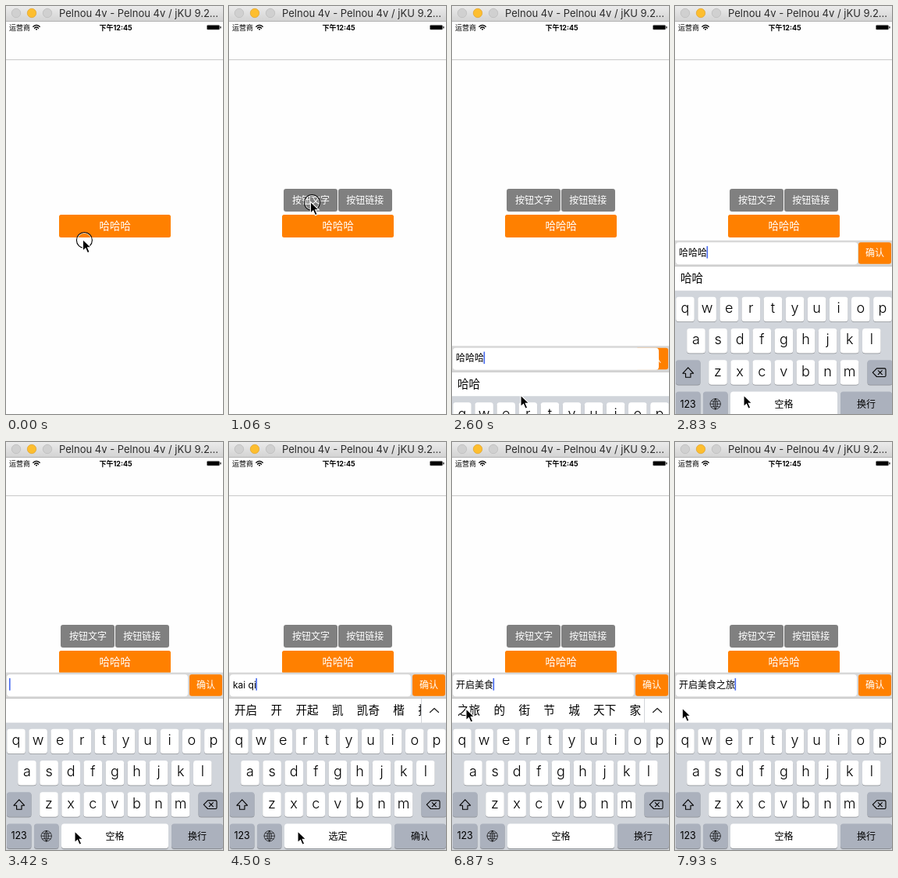
Animation of 278 by 520 pixels, one loop 8 s. Source, as an HTML page:

```html
<!DOCTYPE html>
<html lang="zh">
<head>
<meta charset="utf-8">
<style>
html, body { margin: 0; width: 100%; height: 100%; overflow: hidden; background: #fefefe; }
svg { display: block; width: 100%; height: 100%; }
text { font-family: Inter, 'Noto Sans CJK SC', 'Noto Sans CJK', sans-serif; white-space: pre; }
.cjk { font-family: 'Noto Sans CJK SC', 'Noto Sans CJK', sans-serif; }
.key { font-weight: 300; }
</style>
</head>
<body>
<svg id="stage" viewBox="0 0 278 520">
  <defs>
    <linearGradient id="chrome" x2="0" y2="1">
      <stop stop-color="#ebebeb"/><stop offset="1" stop-color="#d2d2d2"/>
    </linearGradient>
    <clipPath id="candClip"><rect y="33" width="246" height="31"/></clipPath>
  </defs>
</svg>
<script>
const NS = 'http://www.w3.org/2000/svg';
const TICK = 118.3, LOOP = 8000;
const ORANGE = '#ff8000', GRAY_KEY = '#abb1bd';
const BAR_LOW = 486, BAR_HIGH = 293.7;
const stage = document.getElementById('stage');

function el(parent, tag, attrs = {}) {
  const node = document.createElementNS(NS, tag);
  for (const name in attrs) node.setAttribute(name, attrs[name]);
  return parent.appendChild(node);
}
const set = (node, attrs) => { for (const name in attrs) node.setAttribute(name, attrs[name]); };
const show = (node, on) => node.setAttribute('visibility', on ? 'visible' : 'hidden');
const group = parent => el(parent, 'g');
const box = (parent, x, y, width, height, fill, rx = 0) =>
  el(parent, 'rect', { x, y, width, height, fill, rx });
function label(parent, str, x, y, size, fill = '#000', anchor = 'middle', cls = 'cjk') {
  const node = el(parent, 'text', { x, y, 'font-size': size, fill, 'text-anchor': anchor, class: cls });
  node.textContent = str;
  return node;
}
const line = (parent, d, width = 1, stroke = '#000') =>
  el(parent, 'path', { d, fill: 'none', stroke, 'stroke-width': width, 'stroke-linejoin': 'round', 'stroke-linecap': 'round' });

// window chrome, status bar, navigation bar
box(stage, 0, 0, 278, 520, '#fefefe');
box(stage, 0, 0, 278, 20, 'url(#chrome)');
box(stage, 0, 19, 278, 1, '#b4b4b4');
[['#d0d0d0', '#b9b9b9'], ['#fdbe2f', '#e0a12a'], ['#d0d0d0', '#b9b9b9']].forEach(([fill, stroke], i) =>
  el(stage, 'circle', { cx: 13 + 20 * i, cy: 9, r: 5.7, fill, stroke, 'stroke-width': 0.7 }));
label(stage, 'Pelnou 4v - Pelnou 4v / jKU 9.2...', 68, 14, 13, '#2b2b2b', 'start', '');
label(stage, '运营商', 4, 31, 9, '#000', 'start');
line(stage, 'M34.8 26.3Q39 22.4 43.2 26.3M36.5 28.2Q39 25.9 41.5 28.2', 1.3);
el(stage, 'path', { d: 'M37.6 29.4Q39 28.4 40.4 29.4L39 31Z' });
set(label(stage, '下午12:45', 140.5, 31, 9), { 'font-weight': 700, class: '' });
el(stage, 'rect', { x: 257.5, y: 24.4, width: 16, height: 5.7, rx: 1.2, stroke: '#777', 'stroke-width': 0.6 });
box(stage, 274.3, 26, 1.2, 2.6, '#000', 0.5);
box(stage, 0, 68, 278, 1, '#cacaca');

// page buttons
box(stage, 68, 266, 143, 29, ORANGE, 2.5);
label(stage, '哈哈哈', 139.7, 284.7, 13.4, '#fff').setAttribute('font-weight', 300);
const menu = group(stage);
['按钮文字', '按钮链接'].forEach((str, i) => {
  box(menu, 70 + 70 * i, 233, 69, 29, '#808080', 3);
  label(menu, str, 105 + 69.3 * i, 251.6, 12, '#fff');
});

// input bar with candidates and keyboard, all relative to the top of the bar
const panel = group(stage);
box(panel, 0, 0, 278, 34, '#d8d8d8');
const button = box(panel, 235, 2.6, 42, 27.4, ORANGE, 3);
label(panel, '确认', 256, 20.4, 12, '#fff');
const field = box(panel, 1, 2.5, 232, 28, '#fff', 4);
const typed = label(panel, '', 5, 20, 12, '#000', 'start', '');
const caret = box(panel, 5, 7.4, 1.6, 15.5, '#4669ee');

box(panel, 0, 33.3, 278, 31, '#fff');
box(panel, 0, 32.6, 278, 0.7, '#b9b9b9');
const cands = el(panel, 'g', { 'clip-path': 'url(#candClip)' });
const more = group(panel);
box(more, 246, 33.3, 0.8, 31, '#c9ccd1');
line(more, 'M257.5 50.8L263 45.8L268.5 50.8', 1.2, '#222');

box(panel, 0, 64, 278, 170, '#d1d5db');
const rowTop = row => 72 + 40.3 * row;
function key(x, row, width, fill = '#fff') {
  box(panel, x, rowTop(row) + 0.8, width, 31.5, '#898c91', 3.5);
  box(panel, x, rowTop(row), width, 31.5, fill, 3.5);
}
['qwertyuiop', 'asdfghjkl', 'zxcvbnm'].forEach((keys, row) =>
  [...keys].forEach((ch, i) => {
    const cx = [13, 27, 55][row] + 28.1 * i;
    key(cx - 11.8, row, 23.6);
    label(panel, ch, cx, rowTop(row) + 20.3, 18, '#000', 'middle', 'key');
  }));
key(1, 2, 31.5, GRAY_KEY);
key(246.5, 2, 32, GRAY_KEY);
key(1, 3, 31.5, GRAY_KEY);
key(36, 3, 31.5, GRAY_KEY);
key(71, 3, 137, '#fff');
key(212, 3, 66, GRAY_KEY);
line(panel, 'M16.8 162.2L23.6 169.5H20V174.6H13.6V169.5H10Z', 1.1);
line(panel, 'M258.5 163.2H268.5Q270 163.2 270 164.7V172.3Q270 173.8 268.5 173.8H258.5L253.3 168.5ZM260.3 166L265.3 171M265.3 166L260.3 171', 1.1);
line(panel, 'M45 208.5A6.7 6.7 0 1 0 58.4 208.5A6.7 6.7 0 1 0 45 208.5H58.4M51.7 201.8V215.2M51.7 201.8Q45.7 208.5 51.7 215.2M51.7 201.8Q57.7 208.5 51.7 215.2M46.4 204.8Q51.7 207 57 204.8M46.4 212.2Q51.7 210 57 212.2', 0.65);
label(panel, '123', 16.6, 212.8, 12.5, '#000', 'middle', '');
const spaceLabel = label(panel, '空格', 139.5, 213, 12);
const returnLabel = label(panel, '换行', 245, 213, 12);

// pointer
const pointer = group(stage);
const ring = group(pointer);
el(ring, 'circle', { cx: 2, cy: 1, r: 9.2, fill: 'none', stroke: '#fff', 'stroke-width': 1 });
el(ring, 'circle', { cx: 2, cy: 1, r: 10, fill: 'none', stroke: '#000', 'stroke-width': 1.1 });
el(pointer, 'path', {
  d: 'M0 0V14.6L3.5 11.4L6.1 17.2L8.7 16.1L6.2 10.4H10.8Z',
  fill: '#000', stroke: '#fff', 'stroke-width': 1.1
});

// [tick, field text, candidates]
const TYPING = [
  [0, '哈哈哈', '哈哈'],
  [27, '哈哈', '哈 哈哈哈 的 了 啦 是 我 不'],
  [28, '哈', '哈哈 的 哈哈哈 啦 了 你 我'],
  [29, '', ''],
  [33, 'k', '看 可以 快 开 看看 可 卡 口'],
  [34, 'ka', '卡 咖啡 卡片 咖 喀 卡通 咔'],
  [35, 'kai', '开 开始 开心 凯 开车 楷 揩'],
  [37, 'kai q', '开启 开枪 开球 开 凯 开腔 揩'],
  [38, 'kai qi', '开启 开 开起 凯 凯奇 楷 揩'],
  [46, '开启', ''],
  [47, '开启', '美食 的 全 全店 啦 限时 天'],
  [58, '开启美食', '之旅 的 街 节 城 天下 家'],
  [62, '开启美食之旅', '的 了 啦 吧 之 吗 开始 是'],
  [63, '开启美食之旅', '']
];
// [tick, x, y] of the pointer tip
const PATH = [
  [0, 98.4, 297.5], [5, 98.4, 297.5], [6, 100, 288], [8, 104.4, 250], [9, 104.4, 249.5], [12, 104.4, 249.5],
  [13, 104, 256], [16, 94, 400], [18, 84, 480], [19, 85, 489], [20, 88, 496], [49, 88, 496],
  [50, 61.7, 457.6], [52, 36, 394], [54, 20, 350], [56, 18, 340], [64, 18, 340],
  [65, 10, 340], [66, 3, 340], [67, 9.3, 339]
];
const CLICKS = [0, 1, 9, 20, 57, 61];
const BLINK = { 42: 0.5, 43: 0, 44: 1, 52: 0.5, 53: 0, 54: 0, 65: 0.5, 66: 0 };

function pointerAt(tick) {
  const i = PATH.findIndex(p => p[0] > tick);
  if (i < 0) return PATH[PATH.length - 1].slice(1);
  const [t0, x0, y0] = PATH[i - 1], [t1, x1, y1] = PATH[i];
  const u = (tick - t0) / (t1 - t0);
  return [x0 + (x1 - x0) * u, y0 + (y1 - y0) * u];
}

// critically damped spring
function rise(tick) {
  const s = Math.max(0, tick * TICK - 2548.5) * 0.019;
  return 1 - (1 + s) * Math.exp(-s);
}

function showCandidates(str) {
  cands.textContent = '';
  let x = 7;
  for (const word of str ? str.split(' ') : []) {
    label(cands, word, x, 53.6, 14.6, '#000', 'start');
    x += word.length * 14.6 + 17.3;
  }
  show(more, x > 246);
}

function draw(tick) {
  menu.setAttribute('opacity', Math.min(1, tick * 0.4));

  const p = rise(tick);
  const panelOn = tick >= 10;
  panel.setAttribute('display', panelOn ? 'inline' : 'none');
  if (panelOn) {
    panel.setAttribute('transform', `translate(0 ${BAR_LOW + (BAR_HIGH - BAR_LOW) * p})`);
    field.setAttribute('width', 276 - 44 * p);
    const [, str, words] = TYPING.filter(s => s[0] <= tick).pop();
    typed.textContent = str;
    set(caret, {
      x: str ? 5 + typed.getComputedTextLength() - 0.5 : 4,
      opacity: tick < 21 ? 0 : BLINK[tick] ?? 1
    });
    showCandidates(words);
    const composing = tick >= 33 && tick < 46;
    spaceLabel.textContent = composing ? '选定' : '空格';
    returnLabel.textContent = composing ? '确认' : '换行';
  }

  pointer.setAttribute('transform', `translate(${pointerAt(tick)})`);
  show(ring, CLICKS.includes(tick));
}

let last = -1;
const start = performance.now();
function loop() {
  const t = (performance.now() - start) % LOOP;
  const tick = Math.min(67, Math.floor((t + 15) / TICK));
  if (tick !== last) draw(last = tick);
  requestAnimationFrame(loop);
}
draw(0);
loop();
</script>
</body>
</html>
```
